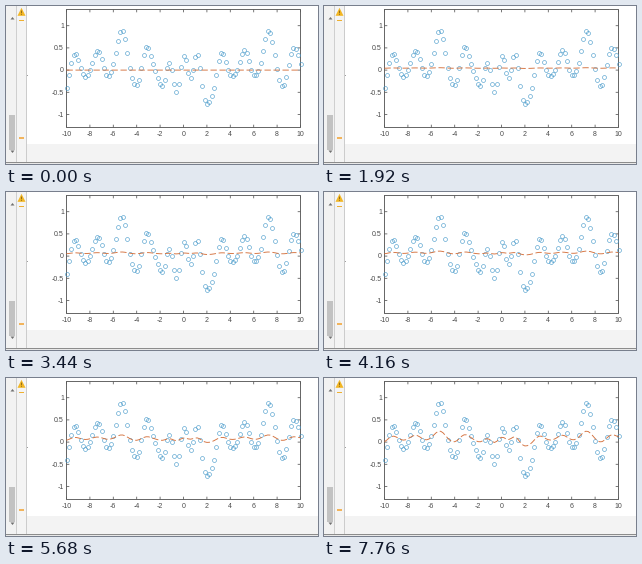
Write a matplotlib script that moves like this. It is 312 by 158 pixels and loops after 8 s.

```python
import numpy as np
import matplotlib.pyplot as plt
from matplotlib.animation import FuncAnimation
from matplotlib.patches import Polygon, Rectangle

W, H, DPI = 312, 158, 100
STEP, FRAMES = 80, 100
PX = 72 / DPI

LEFT, RIGHT, TOP, BOTTOM = 60.5, 294.5, 3.5, 121.5
ZERO, UNIT = 64.1, 44.4
INK = "#585858"

plt.rcParams["font.family"] = "Liberation Sans"
fig = plt.figure(figsize=(W / DPI, H / DPI), dpi=DPI, facecolor="white")
ax = fig.add_axes([0, 0, 1, 1])
ax.set_xlim(0, W)
ax.set_ylim(H, 0)
ax.axis("off")


def col(x):
    return LEFT + (x + 10) * (RIGHT - LEFT) / 20


def row(y):
    return ZERO - y * UNIT


def rect(x, y, w, h, color):
    ax.add_patch(Rectangle((x, y), w, h, facecolor=color, lw=0, snap=False))


def triangle(points, color):
    ax.add_patch(Polygon(points, facecolor=color, lw=0, snap=False))


def stroke(xs, ys, color=INK, width=0.9):
    ax.plot(xs, ys, color=color, lw=width * PX, solid_capstyle="butt",
            solid_joinstyle="miter", snap=False, zorder=2)


def label(x, y, text, ha):
    ax.text(x, y, text, ha=ha, va="center_baseline", fontsize=7 * PX, color="#4a4a4a")


# Window chrome
rect(0, 0, 10, 156, "#f2f2f2")
rect(3, 109, 6, 35, "#c2c2c2")
rect(10, 0, 1, 156, "#cfcfcf")
rect(11, 0, 9, 156, "#f4f4f4")
rect(20, 0, 1, 156, "#cccccc")
rect(21, 138, W - 21, 18, "#f3f3f3")
rect(0, 156, W, 1, "#8c8c8c")
rect(0, 157, W, 1, "#e8e8e8")
rect(21, 69, 1, 1, "#a0a0a0")
triangle([(4.5, 13.5), (8.5, 13.5), (6.5, 11)], "#707070")
triangle([(4.5, 144.5), (8.5, 144.5), (6.5, 147)], "#707070")
triangle([(15.5, 1.8), (19.5, 9.8), (11.5, 9.8)], "#f2b624")
stroke([15.5, 15.5], [4.6, 7.2], "#7a5c18", 0.8)
stroke([15.5, 15.5], [7.9, 8.8], "#7a5c18", 0.8)
rect(13, 14, 5, 1, "#efb030")
rect(13, 131, 5, 2, "#f2b45c")

# Plot box, ticks and labels
stroke([LEFT, RIGHT, RIGHT, LEFT, LEFT], [TOP, TOP, BOTTOM, BOTTOM, TOP])
for v in range(-10, 11, 2):
    x = col(v)
    stroke([x, x], [BOTTOM, BOTTOM - 2.8], width=0.8)
    stroke([x, x], [TOP, TOP + 2.8], width=0.8)
    label(x, 127.5, str(v), "center")
for v in np.arange(-1, 1.1, 0.5):
    y = row(v)
    stroke([LEFT, LEFT + 2.8], [y, y], width=0.8)
    stroke([RIGHT, RIGHT - 2.8], [y, y], width=0.8)
    label(58, y - 0.2, f"{v:g}", "right")

# Samples of a sum of waves with a sinc pulse in the middle
xs = np.linspace(-10, 10, 101)
ys = (np.sinc(2 * xs) - 0.4 * np.cos(3 * xs) + 0.2 * np.sin(2 * xs)
      - 0.28 * np.cos(xs / 2) - 0.09 * np.sin(xs / 2))
ax.plot(col(xs), row(ys), "o", ms=3.9 * PX, mfc="none", mec="#4a9bcb",
        mew=0.6 * PX, snap=False, zorder=3)

# The fit grows towards a smoothed version of the samples
kernel = np.exp(-0.5 * ((xs[:, None] - xs) / 0.2) ** 2)
wave = kernel @ ys / kernel.sum(axis=1) - ys.mean()

fit, = ax.plot([], [], color="#d4703c", lw=0.9 * PX, dashes=[7, 3],
               dash_capstyle="butt", snap=False, zorder=4)


def draw(i):
    t = i / FRAMES
    level = 0.095 * (1 - np.exp(-2.75 * t))
    gain = 0.24 * t ** 2.2
    fit.set_data(col(xs), row(level + gain * wave))
    return fit,


def reset():
    return draw(0)


anim = FuncAnimation(fig, draw, frames=FRAMES, init_func=reset, interval=STEP,
                     repeat=True, repeat_delay=0, blit=False)
plt.show()
```
